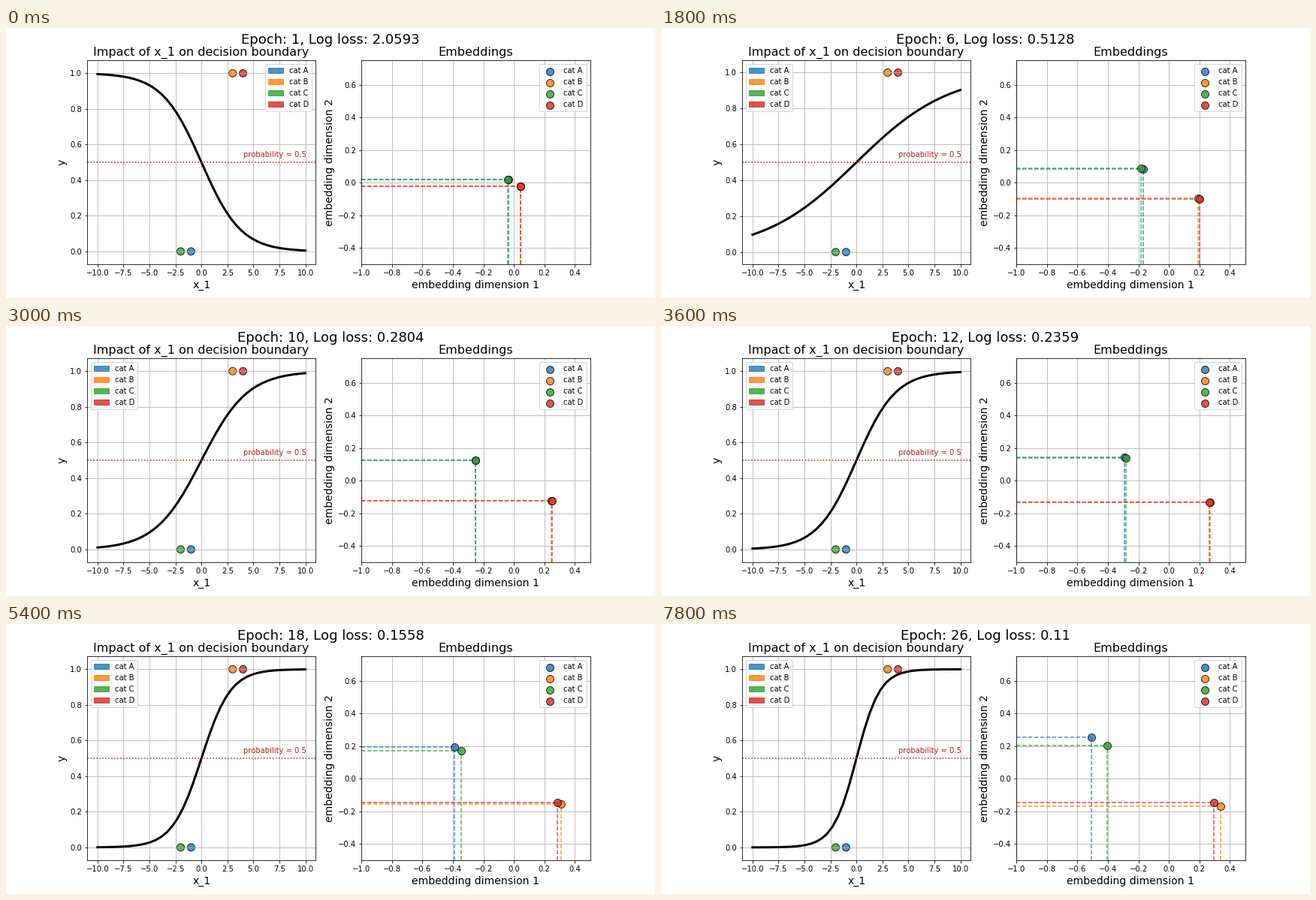
A matplotlib script for the animation above (8000 ms loop, 864 by 360 pixels).

```python
import matplotlib.pyplot as plt
import numpy as np
from matplotlib.animation import FuncAnimation
from matplotlib.patches import Patch

plt.rcParams["text.kerning_factor"] = 6

INTERVAL, FRAMES = 100, 80
FRAMES_PER_EPOCH = 3
MARKER_SIZE, ALPHA = 100, 0.8

# name: colour, (x_1, y), embedding x at the start, middle and end of training
CATS = {
    "cat A": ("#1f77b4", (-1, 0), (-0.036, -0.252, -0.508)),
    "cat B": ("#ff7f0e", (3, 1), (0.043, 0.248, 0.340)),
    "cat C": ("#2ca02c", (-2, 0), (-0.038, -0.252, -0.405)),
    "cat D": ("#d62728", (4, 1), (0.045, 0.250, 0.295)),
}
LOG_KEY_EPOCHS = np.log([1, 10, 26])
LOSS_KEYS = {1: 2.0593, 6: 0.5128, 10: 0.2804, 14: 0.1985,
             18: 0.1558, 22: 0.1289, 26: 0.11}


def log_loss(epoch):
    """Exponential decay between the key epochs."""
    return np.exp(np.interp(epoch, list(LOSS_KEYS), np.log(list(LOSS_KEYS.values()))))


def boundary_slope(epoch):
    return -0.525 + 0.4556 * np.log((epoch + 0.2) / 1.2)


def embedding(keys, epoch):
    """Slowing power-law drift away from the origin along y = -x / 2."""
    growth = np.polyfit(LOG_KEY_EPOCHS, np.log(np.abs(keys)), 2)
    x = np.sign(keys[0]) * np.exp(np.polyval(growth, np.log(epoch)))
    return x, -x / 2


def style(ax, title, xlabel, ylabel):
    ax.set_title(title, fontsize=16)
    ax.set_xlabel(xlabel, fontsize=14)
    ax.set_ylabel(ylabel, fontsize=14)
    ax.grid(True)


fig, (ax_fit, ax_emb) = plt.subplots(1, 2, figsize=(12, 5), dpi=72, facecolor="white")
fig.subplots_adjust(left=0.125, right=0.9, bottom=0.125, top=0.88, wspace=0.2)
heading = fig.suptitle("", fontsize=18)

style(ax_fit, "Impact of x_1 on decision boundary", "x_1", "y")
colors, points, _ = zip(*CATS.values())
xs = np.linspace(-10, 10, 40)
curve, = ax_fit.plot(xs, xs, color="black", lw=3)
ax_fit.scatter(*zip(*points), s=MARKER_SIZE, c=colors, edgecolor="black", alpha=ALPHA)
ax_fit.plot([11, -11], [0.5, 0.5], color="firebrick", ls=":")
ax_fit.text(4, 0.53, "probability = 0.5", color="firebrick")
ax_fit.set_xlim(-11, 11)
ax_fit.legend(handles=[Patch(color=color, label=name, alpha=ALPHA)
                       for name, color in zip(CATS, colors)], loc="best")

style(ax_emb, "Embeddings", "embedding dimension 1", "embedding dimension 2")
ax_emb.set_xlim(-1, 0.5)
ax_emb.set_ylim(-0.5, 0.75)
trackers = []
for name, (color, _, keys) in CATS.items():
    dot = ax_emb.scatter(0, 0, s=MARKER_SIZE, color=color, edgecolor="black",
                         alpha=ALPHA, label=name, zorder=3)
    across, down = (ax_emb.plot([], [], "--", color=color, alpha=ALPHA)[0]
                    for _ in range(2))
    trackers.append((keys, dot, across, down))
ax_emb.legend(loc="upper right")


def fit_ylim(slope):
    """Unit range padded by the marker radius, measured on the curve's own scale."""
    height = ax_fit.get_window_extent().height
    radius = np.sqrt(MARKER_SIZE) / 2
    pad = radius * 1.1 * abs(np.tanh(5 * slope)) / height
    margin = pad + 0.05 * (1 + 2 * pad)
    ax_fit.set_ylim(-margin, 1 + margin)


def update(frame):
    epoch = max(1, frame // FRAMES_PER_EPOCH)
    heading.set_text(f"Epoch: {epoch}, Log loss: {round(float(log_loss(epoch)), 4)}")

    slope = boundary_slope(epoch)
    curve.set_ydata(1 / (1 + np.exp(-slope * xs)))
    fit_ylim(slope)

    for keys, dot, across, down in trackers:
        x, y = embedding(keys, epoch)
        dot.set_offsets([(x, y)])
        across.set_data([-1, x], [y, y])
        down.set_data([x, x], [-0.5, y])


anim = FuncAnimation(fig, update, frames=FRAMES, interval=INTERVAL,
                     init_func=lambda: update(0), repeat=True, repeat_delay=0, blit=False)
plt.show()
```
